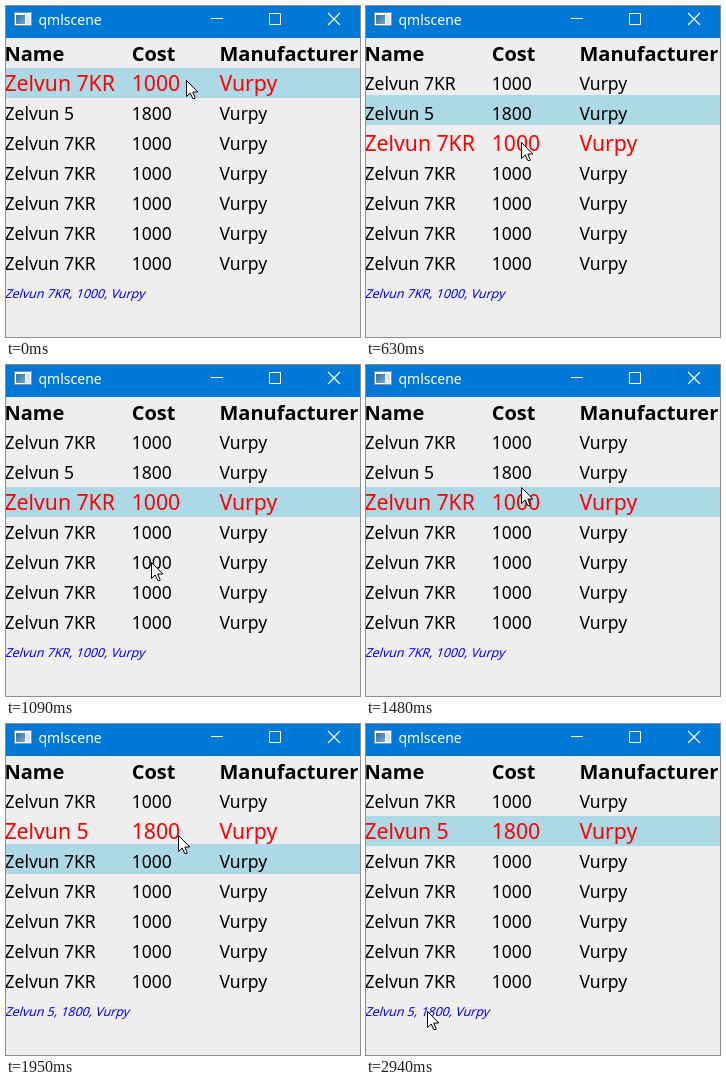
Write an HTML page with a canvas that moves like this. It is 354x331 px and loops after 3010 ms.

```html
<!DOCTYPE html>
<html lang="en">
<head>
<meta charset="utf-8">
<title>qmlscene</title>
<style>
  html, body { margin: 0; width: 100%; height: 100%; overflow: hidden; background: #eee; }
  canvas { display: block; }
</style>
</head>
<body>
<canvas id="stage" width="354" height="331"></canvas>
<script>
const ctx = document.getElementById('stage').getContext('2d');
const LOOP = 3010;
const TICK = LOOP / 39;          // the picture refreshes in hard steps
const FONT = '"Noto Sans", "Open Sans", sans-serif';
const COLUMNS = [-1.5, 125.7, 213.5];
const LIST_TOP = 62, ROW_HEIGHT = 30;
const HIGHLIGHT_SPEED = 0.44;    // px per ms
const SELECT_DELAY = 16;         // ms from button release to selection

const phone = ['Zelvun 7KR', '1000', 'Vurpy'];
const rows = Array(7).fill(phone).with(1, ['Zelvun 5', '1800', 'Vurpy']);

const clicks = [
  { down: 460, up: 539, row: 2 },
  { down: 1770, up: 1909, row: 1 }
];

// Mouse waypoints: [tick, x, y]
const path = [
  [0, 180, 74], [4, 155, 136], [8, 155, 136], [9, 155, 143], [12, 147, 211],
  [13, 147, 211], [16, 141, 168], [19, 155, 122], [21, 172, 111],
  [29, 172, 111], [30, 159, 125], [35, 62, 287], [38, 61, 287]
];

const rowTop = row => LIST_TOP + row * ROW_HEIGHT;

function cursorAt(tick) {
  const next = Math.max(1, path.findIndex(point => point[0] >= tick));
  const [t0, x0, y0] = path[next - 1];
  const [t1, x1, y1] = path[next];
  const k = (tick - t0) / (t1 - t0);
  return [Math.round(x0 + (x1 - x0) * k), Math.round(y0 + (y1 - y0) * k)];
}

function listStateAt(time) {
  let selected = 0, highlightY = LIST_TOP;
  for (const { up, row } of clicks) {
    const elapsed = time - up - SELECT_DELAY;
    if (elapsed < 0) break;
    const distance = rowTop(row) - rowTop(selected);
    const travelled = Math.min(elapsed * HIGHLIGHT_SPEED, Math.abs(distance));
    highlightY = Math.round(rowTop(selected) + Math.sign(distance) * travelled);
    selected = row;
  }
  return { selected, highlightY };
}

function text(str, x, y, size, color, weight = 400) {
  ctx.font = `${weight} ${size}px ${FONT}`;
  ctx.fillStyle = color;
  ctx.fillText(str, x, y);
}

function rect(x, y, w, h, color) {
  ctx.fillStyle = color;
  ctx.fillRect(x, y, w, h);
}

function drawTitleBar() {
  rect(0, 0, 354, 32, '#0078d7');
  rect(8, 6, 18, 14, '#8a9299');
  rect(9, 7, 16, 12, '#fff');
  const pane = ctx.createLinearGradient(10, 9, 19, 18);
  pane.addColorStop(0, '#2f6fa6');
  pane.addColorStop(1, '#6fa8c8');
  rect(10, 9, 9, 9, pane);
  rect(20, 9, 4, 9, '#dfe5e9');
  text('qmlscene', 32.5, 19, 14, '#fff');

  ctx.strokeStyle = '#fff';
  ctx.lineWidth = 1;
  ctx.beginPath();
  ctx.moveTo(205, 12.5);
  ctx.lineTo(217, 12.5);
  ctx.rect(263.5, 7.5, 11, 11);
  ctx.stroke();
  ctx.lineWidth = 1.2;
  ctx.beginPath();
  ctx.moveTo(322, 7);
  ctx.lineTo(334, 19);
  ctx.moveTo(334, 7);
  ctx.lineTo(322, 19);
  ctx.stroke();
}

function drawTable({ selected, highlightY }) {
  rect(0, highlightY, 354, ROW_HEIGHT, '#add8e6');
  ['Name', 'Cost', 'Manufacturer'].forEach((label, i) =>
    text(label, COLUMNS[i], 55, 20, '#000', 700));
  rows.forEach((row, r) => {
    const [size, color, baseline] = r === selected ? [21.2, '#f00', 23] : [17.5, '#000', 22];
    row.forEach((cell, i) => text(cell, COLUMNS[i], rowTop(r) + baseline, size, color));
  });
}

function drawStatus(str) {
  ctx.save();
  ctx.transform(1, 0, -0.3, 1, -1.5, 292);
  text(str, 0, 0, 12.4, '#00f');
  ctx.restore();
}

const arrow = new Path2D('M0 0V16L3.7 12.5L6.3 18H8.5V17L6.3 11.5H11.3Z');

function drawCursor([x, y], pressed) {
  if (pressed) {
    ctx.fillStyle = 'rgba(255, 255, 0, 0.47)';
    ctx.beginPath();
    ctx.arc(x, y, 15, 0, Math.PI * 2);
    ctx.fill();
  }
  ctx.save();
  ctx.translate(x + 0.5, y + 0.5);
  ctx.fillStyle = '#fff';
  ctx.strokeStyle = '#000';
  ctx.lineWidth = 1;
  ctx.fill(arrow);
  ctx.stroke(arrow);
  ctx.restore();
}

function draw() {
  const tick = Math.floor((performance.now() % LOOP) / TICK);
  const time = tick * TICK;
  const state = listStateAt(time);
  rect(0, 0, 354, 331, '#eee');
  drawTitleBar();
  drawTable(state);
  drawStatus(rows[state.selected].join(', '));
  drawCursor(cursorAt(tick), clicks.some(c => time >= c.down && time < c.up));
  requestAnimationFrame(draw);
}
draw();
</script>
</body>
</html>
```
